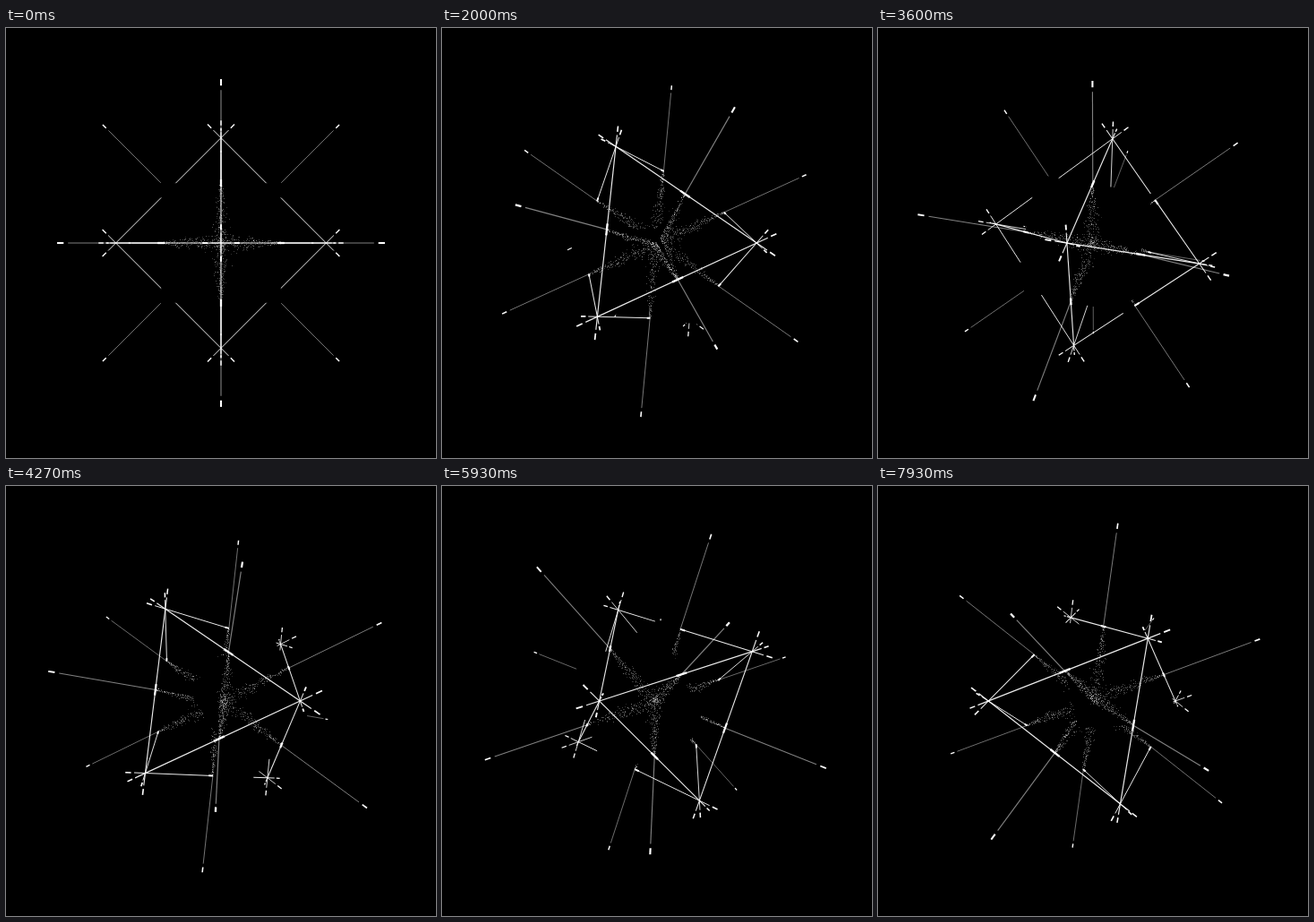
These frames come from a looping animation (480 by 480 pixels, 8 s). An HTML page with a canvas:

```html
<!DOCTYPE html>
<html lang="en">
<head>
<meta charset="utf-8">
<title>Rotating octahedron</title>
<style>
html, body { margin: 0; width: 100%; height: 100%; overflow: hidden; background: #000; }
canvas { display: block; width: 480px; height: 480px; }
</style>
</head>
<body>
<canvas id="stage" width="480" height="480"></canvas>
<script>
const ctx = document.getElementById('stage').getContext('2d');
const LOOP = 8000, STEP = 1000 / 15;
const TURN = 5000, CYCLE = TURN + STEP / 2; // each turn ends with a brief hold
const CAM = 475;
const H = 58.7;                             // half side of the hidden cube

let seed = 7;
function rand() {
  seed = (seed * 16807) % 2147483647;
  return seed / 2147483647;
}
const gauss = () => rand() + rand() + rand() + rand() - 2;

const lines = [];
const dust = [];
function addLine(from, to, width, alpha) {
  lines.push({ from, to, width, alpha });
}

// One octahedron edge with its ticks, the ray through its middle and the dust inside
function addArm(a, b, sa, sb) {
  const c = 3 - a - b;
  const at = (p, q, r = 0) => {
    const v = [0, 0, 0];
    v[a] = sa * p;
    v[b] = sb * q;
    v[c] = r;
    return v;
  };
  const edge = t => at(H + t, H - t);
  const ray = k => at(H * k, H * k);

  addLine(edge(-H - 8.5), edge(H + 8.5), 1, 0.92);
  addLine(edge(-4), edge(4), 2, 1);
  for (const s of [-1, 1]) addLine(edge(s * (H + 10.8)), edge(s * (H + 15)), 1.4, 1);
  addLine(ray(1), ray(2.14), 0.9, 0.5);
  addLine(ray(2.185), ray(2.25), 1.5, 1);

  for (let i = 0; i < 430; i++) {
    const u = rand();
    const spread = 7.5 * Math.min(1, 0.12 + 1.3 * u);
    const d = gauss() * spread * 0.6;
    const r = H * (1 - u);
    dust.push({ p: at(r + d, r - d, gauss() * spread), alpha: 0.14 + 0.22 * rand() });
  }
}

for (const [a, b] of [[0, 1], [0, 2], [1, 2]])
  for (const sa of [-1, 1])
    for (const sb of [-1, 1]) addArm(a, b, sa, sb);

// Is p hidden by one of the triangles that join the centre to the cube's edges?
function hidden(p, eye) {
  for (let c = 0; c < 3; c++) {
    const a = (c + 1) % 3, b = (c + 2) % 3;
    for (let s = -1; s <= 1; s += 2) {
      const fp = p[a] - s * p[b], fe = eye[a] - s * eye[b];
      if (fp * fe >= 0) continue;
      const t = fp / (fp - fe);
      if (t < 1e-6) continue;
      const qa = Math.abs(p[a] + t * (eye[a] - p[a]));
      const qc = Math.abs(p[c] + t * (eye[c] - p[c]));
      if (qa <= H && qc <= qa) return true;
    }
  }
  return false;
}

function project([x, y, z], sin, cos) {
  const y1 = y * cos - z * sin, z1 = y * sin + z * cos;
  const x2 = x * cos + z1 * sin, z2 = z1 * cos - x * sin;
  const k = CAM / (CAM - z2);
  return { x: 240 + x2 * k, y: 240 - y1 * k, k };
}

const mix = (p, q, t) => p.map((v, i) => v + (q[i] - v) * t);

function drawLine({ from, to, width, alpha }, eye, sin, cos) {
  const n = Math.ceil(Math.hypot(...from.map((v, i) => v - to[i])));
  const mid = project(mix(from, to, 0.5), sin, cos);
  ctx.lineWidth = width * mid.k;
  ctx.strokeStyle = `rgba(255,255,255,${alpha})`;
  ctx.beginPath();
  let open = false;
  for (let i = 0; i < n; i++) {
    const seen = !hidden(mix(from, to, (i + 0.5) / n), eye);
    if (seen && !open) {
      const s = project(mix(from, to, i / n), sin, cos);
      ctx.moveTo(s.x, s.y);
    }
    if (open && !seen || seen && i === n - 1) {
      const e = project(mix(from, to, (seen ? n : i) / n), sin, cos);
      ctx.lineTo(e.x, e.y);
    }
    open = seen;
  }
  ctx.stroke();
}

function draw(time) {
  const angle = Math.min(1, (time % CYCLE) / TURN) * 2 * Math.PI;
  const sin = Math.sin(angle), cos = Math.cos(angle);
  // Camera position in the object's own axes
  const eye = [-CAM * sin, CAM * cos * sin, CAM * cos * cos];

  ctx.fillStyle = '#000';
  ctx.fillRect(0, 0, 480, 480);
  ctx.fillStyle = '#fff';
  for (const { p, alpha } of dust) {
    if (hidden(p, eye)) continue;
    const s = project(p, sin, cos);
    ctx.globalAlpha = alpha;
    ctx.fillRect(Math.floor(s.x), Math.floor(s.y), 1, 1);
  }
  ctx.globalAlpha = 1;
  for (const line of lines) drawLine(line, eye, sin, cos);
}

const start = performance.now();
let shown = -1;
function tick() {
  const t = (performance.now() - start) % LOOP;
  const frame = Math.floor((t + 4) / STEP) % 120;
  if (frame !== shown) {
    shown = frame;
    draw(frame * STEP);
  }
  requestAnimationFrame(tick);
}
tick();
</script>
</body>
</html>
```
